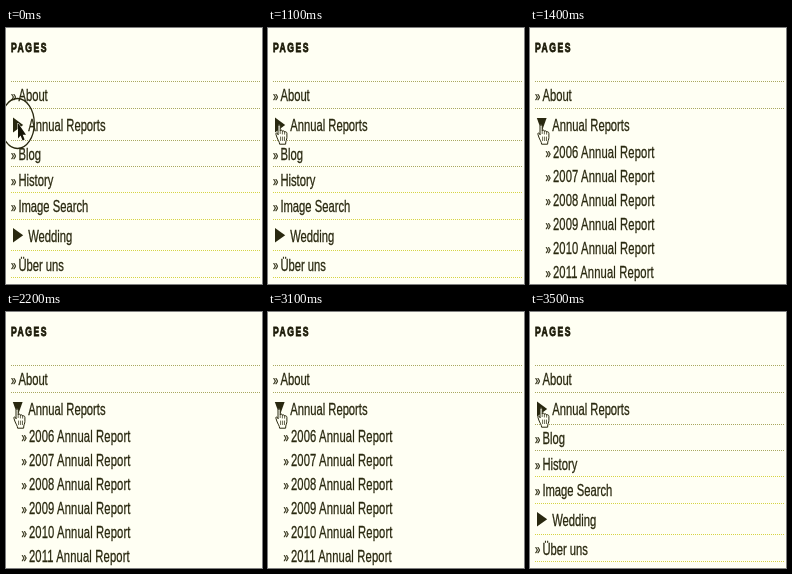
Animation of 256 by 256 pixels, one loop 3700 ms. Source, as an HTML page:

```html
<!DOCTYPE html>
<html lang="en">
<head>
<meta charset="utf-8">
<title>Pages menu</title>
<style>
  html, body { margin: 0; width: 100%; height: 100%; overflow: hidden; background: #fffff3; }
  svg { display: block; width: 100vw; height: 100vh; }
  text { font: 16.4px "Liberation Sans", Arial, sans-serif; fill: #29280f; stroke: #29280f; stroke-width: .3px; }
  .title { font-size: 12.6px; font-weight: bold; letter-spacing: 2.2px; fill: #1c1b08; stroke: #1c1b08; stroke-width: .8px; }
  .mark { font-size: 14px; }
  .sub { letter-spacing: .2px; }
</style>
</head>
<body>
<svg id="stage" viewBox="0 0 256 256">
  <rect width="256" height="256" fill="#fffff3"/>
  <g id="fixed"></g>
  <g id="closed"></g>
  <g id="opened"></g>
  <path id="arrow" d="M12 95V110.5L14.6 107.6L16.6 112.6L18.6 111.6L16.7 106.8H20Z"
    fill="#151406" stroke="#fffff3" stroke-width="1" paint-order="stroke"/>
  <g id="hand" stroke="#29280f" stroke-linejoin="round" stroke-linecap="round">
    <path fill="#fffff3" stroke-width="1" d="M10 106.4V98.2C10 96.4 12.2 96.4 12.2 98.2V102.8
      C12.8 101.7 14.2 102 14.4 103.2C15 102.5 16.4 102.8 16.6 104C17.4 103.4 18.9 103.9 18.9 105.3
      V109.4C18.9 111.8 17.6 112.6 17.6 116.2H11.6C11.6 113.8 9.8 112 8.8 109L7.9 106.2C7.6 104.7 9.1 104.3 10 106.4Z"/>
    <path fill="none" stroke-width=".7" d="M12.2 102.6V105.6M14.4 103.2V106M16.6 104V106.2M12.6 109V112.6M14.6 109V112.6M16.5 109V112.6"/>
  </g>
  <ellipse id="ring" cx="11.5" cy="95.5" rx="16.8" ry="25" fill="none" stroke="#29280f" stroke-width="1.3"/>
</svg>
<script>
const LOOP = 3700, RING_END = 100, HOVER = 700, SETTLE = 800, OPEN = 1400, CLOSE = 3400;
const SQUEEZE = 0.685; // the whole menu is set in condensed type
const INK = "#29280f", OLIVE = "#a9a860", YELLOW = "#d6d444";
const $ = id => document.getElementById(id);

function add(parent, tag, attrs, content = "") {
  const el = document.createElementNS("http://www.w3.org/2000/svg", tag);
  for (const key in attrs) el.setAttribute(key, attrs[key]);
  el.textContent = content;
  $(parent).append(el);
}

function label(parent, x, y, content, cls = "") {
  add(parent, "text", { transform: `translate(${x} ${y}) scale(${SQUEEZE} 1)`, class: cls }, content);
}

function item(parent, x, y, content, cls) {
  label(parent, x, y - 0.5, "»", "mark");
  label(parent, x + 7.4, y, content, cls);
}

function rule(parent, y, color) {
  add(parent, "path", { d: `M5 ${y + 0.5}H255`, stroke: color, "stroke-dasharray": "1 1" });
}

function triangle(parent, d) {
  add(parent, "path", { d, fill: INK });
}

label("fixed", 5, 24, "PAGES", "title");
rule("fixed", 53, OLIVE);
item("fixed", 5, 73, "About");
rule("fixed", 80, OLIVE);
label("fixed", 22.2, 103, "Annual Reports");

triangle("closed", "M7 89.5L17.2 97L7 104.5Z");
for (const y of [112, 138]) rule("closed", y, OLIVE);
for (const y of [164, 191, 222, 249]) rule("closed", y, YELLOW);
item("closed", 5, 132, "Blog");
item("closed", 5, 158, "History");
item("closed", 5, 184, "Image Search");
triangle("closed", "M7 200L17.2 207.3L7 214.6Z");
label("closed", 22.2, 214, "Wedding");
item("closed", 5, 242.5, "Über uns");

triangle("opened", "M6.8 90H16.6L11.8 103.5Z");
for (let i = 0; i < 6; i++) item("opened", 15.5, 130 + 24 * i, `${2006 + i} Annual Report`, "sub");

function show(id, on) {
  $(id).setAttribute("visibility", on ? "visible" : "hidden");
}

function draw(t) {
  const open = t >= OPEN && t < CLOSE;
  show("closed", !open);
  show("opened", open);
  show("ring", t < RING_END);
  show("arrow", t < HOVER);
  show("hand", t >= HOVER);
  $("hand").setAttribute("transform", `translate(0 ${t < SETTLE || t >= CLOSE ? -1 : 0})`);
}

const start = performance.now();
function tick() {
  draw((performance.now() - start) % LOOP);
  requestAnimationFrame(tick);
}
tick();
</script>
</body>
</html>
```
